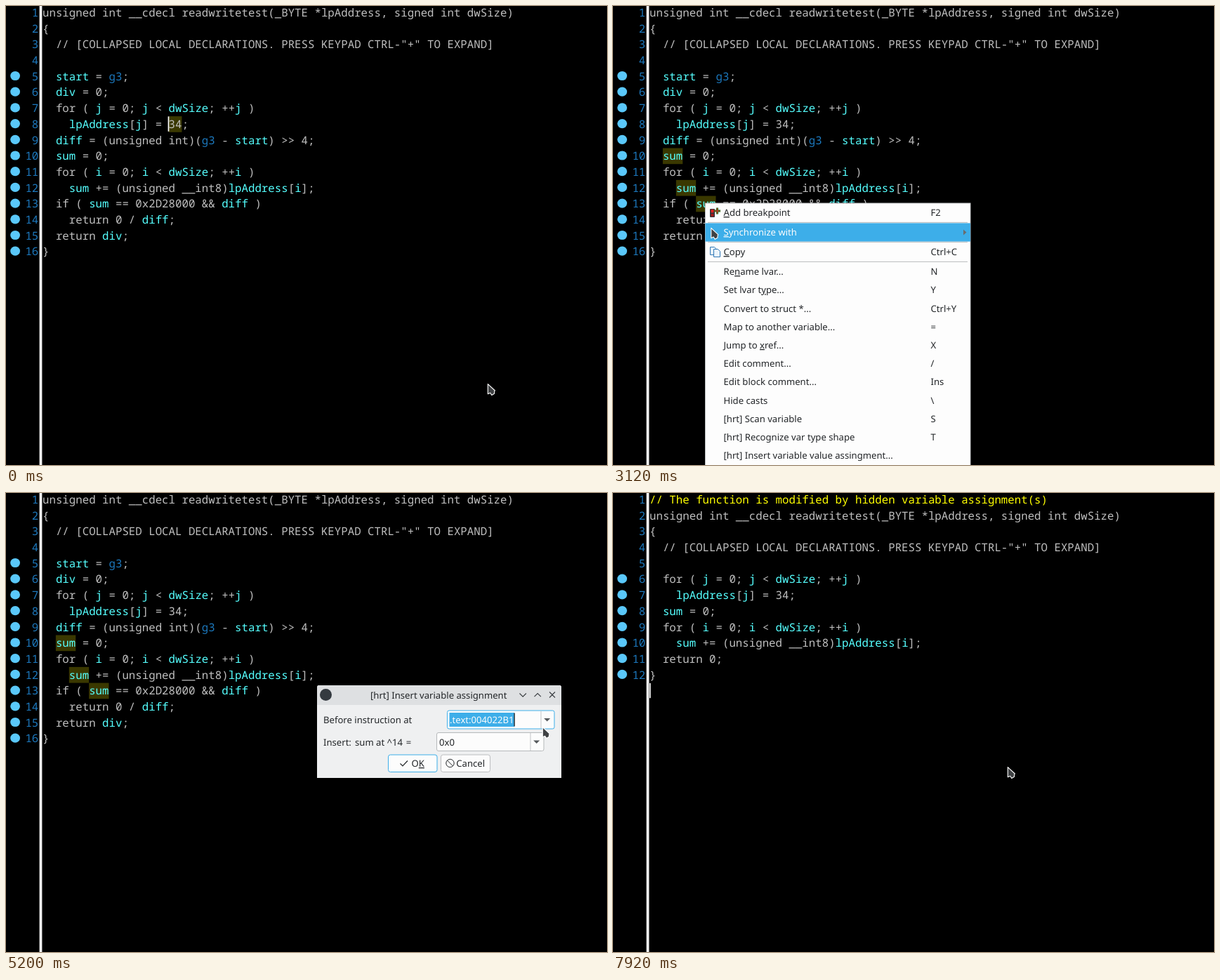
Recreate the animation shown at these times as an HTML page. Size 856 by 654 pixels, loop 8 s.

```html
<!DOCTYPE html>
<html lang="en">
<head>
<meta charset="utf-8">
<title>Inserting a variable assignment</title>
<style>
html, body { margin: 0; width: 100%; height: 100%; overflow: hidden; background: #000; }
svg { display: block; width: 856px; height: 654px; }
text { white-space: pre; text-rendering: geometricPrecision; }
.mono { font: 15.75px "Noto Sans Mono", monospace; fill: #bfbfbf; }
.ui { font: 13.12px "Noto Sans", sans-serif; fill: #232629; }
.var { fill: #55ffff; }
.num { fill: #1c78bd; }
.key { text-decoration: underline; }
</style>
</head>
<body>
<svg id="stage" viewBox="0 0 856 654" xmlns="http://www.w3.org/2000/svg"></svg>
<script>
const LOOP = 8000, STEP = 80;
const CW = 9.45, ROW = 22.7, LEFT = 52;
const BLUE = '#3daee9';

const before = [
  'unsigned int __cdecl readwritetest(_BYTE *lpAddress, signed int dwSize)',
  '{',
  '  // [COLLAPSED LOCAL DECLARATIONS. PRESS KEYPAD CTRL-"+" TO EXPAND]',
  '',
  '  start = g3;',
  '  div = 0;',
  '  for ( j = 0; j < dwSize; ++j )',
  '    lpAddress[j] = 34;',
  '  diff = (unsigned int)(g3 - start) >> 4;',
  '  sum = 0;',
  '  for ( i = 0; i < dwSize; ++i )',
  '    sum += (unsigned __int8)lpAddress[i];',
  '  if ( sum == 0x2D28000 && diff )',
  '    return 0 / diff;',
  '  return div;',
  '}'
];
const after = [
  '// The function is modified by hidden variable assignment(s)',
  ...before.slice(0, 4),
  before[6], before[7], before[9], before[10], before[11],
  '  return 0;',
  '}'
];

// A tilde precedes each accelerator letter.
const menuItems = [
  ['~Add breakpoint', 'F2', 294.5],
  ['~Synchronize with', '', 322.5],
  ['~Copy', 'Ctrl+C', 350.5],
  ...[
    ['Re~name lvar...', 'N'],
    ['Set lvar t~ype...', 'Y'],
    ['Convert to struct *...', 'Ctrl+Y'],
    ['Map to another variable...', '='],
    ['Jump to ~xref...', 'X'],
    ['Edit comment...', '/'],
    ['Edit block comment...', 'Ins'],
    ['Hide casts', '\\'],
    ['[hrt] Scan variable', 'S'],
    ['[hrt] Recognize var type shape', 'T'],
    ['[hrt] Insert variable value assingment...', '']
  ].map(([label, key], i) => [label, key, 378.5 + i * 26.2])
];
const listItems = ['.text:004022B1', '.text:004022ab', '.text:004022ae', '.text:004023B0',
  '00000001800335B8', '180036AF8', '0x00402325', '+0x8012', '+80d2', '+127e'];

// time, x, y, and 1 for a constant-speed segment
const path = [
  [0, 686, 538], [720, 122, 280], [880, 119, 278],
  [960, 150, 262, 1], [1040, 202, 263, 1], [1120, 242, 276, 1], [1200, 264, 280, 1],
  [1440, 264, 280], [2080, 131, 280], [3040, 130, 281],
  [3520, 187, 490, 1], [3920, 200, 609, 1], [4160, 206, 632],
  [4480, 206, 632], [4960, 726, 270], [5200, 764, 333],
  [5280, 764, 333], [5440, 766, 322], [5520, 766, 322], [5920, 644, 360],
  [6720, 644, 360], [7200, 559, 394], [7360, 562, 390], [8000, 562, 390]
];

const esc = s => s.replace(/&/g, '&amp;').replace(/</g, '&lt;');
const rect = (x, y, w, h, fill, more = '') =>
  `<rect x="${x}" y="${y}" width="${w}" height="${h}" fill="${fill}" ${more}/>`;
const text = (cls, x, y, body, more = '') =>
  `<text class="${cls}" x="${x}" y="${y}" ${more}>${body}</text>`;
const line = (d, stroke, width = 1) =>
  `<path d="${d}" fill="none" stroke="${stroke}" stroke-width="${width}"/>`;
const shape = (d, fill) => `<path d="${d}" fill="${fill}"/>`;
const group = (id, body = '') => `<g id="${id}">${body}</g>`;
const ramp = (t, a, b) => Math.min(1, Math.max(0, (t - a) / (b - a)));
const within = (t, a, b) => t >= a && t < b;

const colX = c => LEFT + c * CW;
const rowTop = r => r * ROW - 1.8;
const baseline = r => 14.9 + r * ROW;

function codeLine(s, r, proto) {
  const body = r <= proto ? esc(s) : esc(s).replace(
    /\b(start|div|dwSize|lpAddress|diff|sum|i|j|g3)\b/g,
    v => `<tspan class="${v === 'g3' ? 'num' : 'var'}">${v}</tspan>`);
  const color = s.startsWith('//') ? 'style="fill:#ffff00"' : '';
  return text('mono', LEFT, baseline(r), body, color);
}

function codeView(lines, firstDot) {
  return lines.map((s, r) => {
    const dot = r >= firstDot
      ? `<ellipse cx="13.1" cy="${baseline(r) - 6.2}" rx="6.9" ry="6.6" fill="#5ac8fa"/>` : '';
    return dot + text('mono', 46.3, baseline(r), r + 1,
      'text-anchor="end" style="fill:#1c78bd"') + codeLine(s, r, firstDot - 2);
  }).join('');
}

const mark = (r, c, n) => rect(colX(c), rowTop(r), n * CW, ROW, '#3a3800');
const caret = (r, x) => rect(x - 0.9, rowTop(r) + 0.3, 1.7, ROW - 1.4, '#fff');

function selection(r, from, to, right = colX(to)) {
  return rect(colX(from), rowTop(r), right - colX(from), ROW, '#a0a0a0') +
    text('mono', colX(from), baseline(r), esc(before[r].slice(from, to)), 'style="fill:#fff"');
}

function tooltip(x, y, w, body) {
  return rect(x + 0.5, y + 0.5, w, 25, '#260b12', 'stroke="#8a7c80"') +
    text('mono', x + 1.2, y + 18, body);
}

function menu() {
  const rows = menuItems.map(([label, key, y]) =>
    text('ui', 157.5, y + 4.6, label.replace(/~(.)/, '<tspan class="key">$1</tspan>')) +
    text('ui', 452.5, y + 4.6, esc(key))).join('');
  const rules = [308.4, 336.4, 364.4].map(y => line(`M135 ${y}H505`, '#b9bbbd')).join('');
  const addIcon = rect(138, 289, 7, 12, '#30363c', 'rx="1"') +
    rect(139.5, 290, 4, 4.5, '#e02020') + rect(139.5, 296, 4, 4, '#a01818') +
    line('M148.5 287.5v9M144 292h9', '#176f17', 3) + line('M148.5 288v8M144.5 292h8', '#e03030', 1);
  const copyIcon = '<g fill="#eaf4fc" stroke="#3178b5">' +
    '<path d="M138.5 343.5h6l2 2v9h-8z"/><path d="M143.5 346.5h6l3 3v8h-9z"/></g>';
  return rect(131.5, 281, 377.5, 380, '#fdfdfd', 'stroke="#c4c6c8"') + group('hover') +
    rules + addIcon + copyIcon + shape('M499 318.5l4.5 4l-4.5 4z', '#6a6d70') +
    group('rows', rows);
}

function combo(id, x, y) {
  return rect(x, y, 152.5, 26, '#fcfcfc', `id="${id}" rx="2.5" stroke="#b6b9bb"`) +
    line(`M${x + 133.5} ${y + 0.5}v25`, '#c3c5c7') +
    shape(`M${x + 137.7} ${y + 11}h9l-4.5 4.5z`, '#55595c');
}

function dialog() {
  return shape('M443 406V277q0 -3 3 -3H788q3 0 3 3V406z', '#eff0f1') +
    shape('M443 302V277q0 -3 3 -3H788q3 0 3 3V302z', '#dee0e2') +
    '<circle cx="455.5" cy="287.5" r="8.5" fill="#343a40"/>' +
    text('ui', 519, 293, '[hrt] Insert variable assignment') +
    line('M731.5 285.5l4.7 4.7l4.7 -4.7M752.5 290.2l4.7 -4.7l4.7 4.7' +
      'M774 283.5l8 8M782 283.5l-8 8', '#3a3e42', 1.1) +
    text('ui', 452, 328, 'Before instruction at') +
    text('ui', 452, 359.5, 'Insert:') + text('ui', 497, 359.5, 'sum at ^14') +
    text('ui', 569.8, 359.5, '=') +
    combo('field1', 628.5, 310) + combo('field2', 613.5, 341.5) + group('entry') +
    text('ui', 617, 359.5, '0x0') +
    rect(544.5, 373, 69.5, 24.5, '#fcfcfc', `id="ok" rx="3" stroke="${BLUE}"`) +
    line('M561.5 385.5l3.5 3.5l7 -7.5', '#232629', 1.2) +
    text('ui', 577.5, 390, 'O<tspan class="key">K</tspan>') +
    rect(619.5, 373, 70, 24.5, '#fcfcfc', 'rx="3" stroke="#bcbec0"') +
    '<circle cx="632.5" cy="385" r="5.7" fill="none" stroke="#232629"/>' +
    line('M628.5 381l8 8', '#232629') + text('ui', 641.3, 390, 'Cancel');
}

function popup() {
  return rect(629, 337, 152, 191.5, '#fcfcfc', 'stroke="#c4c6c8"') + group('pick') +
    listItems.map((s, i) => text('ui', 632, 351 + i * 19.2, s)).join('') +
    rect(767.5, 337.5, 13, 190.5, '#e6e7e8') + rect(771, 350, 6, 120, '#b0b4b7', 'rx="3"') +
    shape('M770 343.5l4 -4l4 4zM770 519l4 4l4 -4z', '#55595c');
}

const sumTip = 'int sum; <tspan fill="#c88a28">//</tspan>' +
  '<tspan fill="#7fb6c4"> [esp+14h] [ebp-Ch]</tspan>';

const stage = document.getElementById('stage');
stage.innerHTML = rect(0, 0, 856, 654, '#000') + group('under') +
  group('codeA', codeView(before, 4)) + group('codeB', codeView(after, 5)) +
  rect(47.6, 0, 3.8, 654, '#f2f2f2') + group('over') +
  group('tipA', tooltip(285, 305, 97, '<tspan fill="#dede00">fixed; int</tspan>')) +
  group('tipB', tooltip(153, 308, 285, sumTip)) +
  group('menu', menu()) + group('dialog', dialog()) + group('list', popup()) +
  group('arrow', '<path d="M0.3 0.6V14.8L3.7 13.2L5.8 16.5L9.5 14.2V11.5L10.4 10Z" ' +
    'fill="#404244" stroke="#fff" stroke-width="1.1" stroke-linejoin="round"/>') +
  group('beam', line('M-2.5 -7h2l.5 .5l.5 -.5h2M0 -6.5V6.5M-2.5 7h2l.5 -.5l.5 .5h2', '#222'));

const el = {};
stage.querySelectorAll('[id]').forEach(n => el[n.id] = n);

function fade(node, a) {
  node.style.display = a > 0 ? '' : 'none';
  node.style.opacity = a;
}

function pointer(t) {
  const i = Math.max(1, path.findIndex(p => p[0] > t));
  const [t0, x0, y0] = path[i - 1], [t1, x1, y1, linear] = path[i];
  let k = ramp(t, t0, t1);
  if (!linear) k = k * k * (3 - 2 * k);
  return [x0 + (x1 - x0) * k, y0 + (y1 - y0) * k];
}

function drawCode(t) {
  const done = t >= 7840;
  let under = '', over = '';
  if (t < 880) {
    under = mark(7, 19, 2);
    over = caret(7, colX(19));
  } else if (within(t, 880, 960) || within(t, 2160, 7840)) {
    under = mark(9, 2, 3) + mark(11, 4, 3) + mark(12, 7, 3);
    if (t < 960) over = caret(12, colX(7));
    else if (t < 2880) over = caret(12, colX(9));
  } else if (t < 1120) {
    over = selection(11, t < 1040 ? 10 : 16, 60, 856) + selection(12, 0, 7);
  } else if (t < 2160) {
    const end = t < 1200 ? 20 : 23;
    over = selection(12, 7, end) + caret(12, colX(end));
  } else {
    over = caret(12, 52.8);
  }
  el.under.innerHTML = under;
  el.over.innerHTML = over;
  fade(el.codeA, done ? 0 : 1);
  fade(el.codeB, done ? 1 : 0);
}

function drawMenu(t, y) {
  fade(el.menu, Math.min(ramp(t, 2720, 2880), 1 - ramp(t, 4400, 4640)));
  const hot = t < 3120 ? -1 : menuItems.findIndex(m => Math.abs(m[2] - y) <= 13.1);
  el.hover.innerHTML = hot < 0 ? '' : rect(131.5, menuItems[hot][2] - 13.1, 377.5, 26.2, BLUE);
  [...el.rows.children].forEach((n, i) => n.style.fill = i >> 1 === hot ? '#fcfcfc' : '');
}

function drawDialog(t, y) {
  fade(el.dialog, Math.min(ramp(t, 4480, 4720), 1 - ramp(t, 7680, 7920)));
  const chosen = t >= 6240;
  el.entry.innerHTML =
    (chosen ? '' : rect(631.5, 313, 92.5, 20, BLUE)) +
    text('ui', 632, 328, listItems[chosen ? 1 : 0], chosen ? '' : 'style="fill:#fcfcfc"') +
    (t < 5360 || within(t, 6240, 6560) ? rect(723.5, 313.5, 1.2, 19, '#111') : '') +
    (within(t, 6720, 7200) ? rect(639.5, 345, 1.2, 19, '#111') : '');
  el.field1.setAttribute('stroke', t < 6720 ? BLUE : '#b6b9bb');
  el.field2.setAttribute('stroke', within(t, 6720, 7520) ? BLUE : '#b6b9bb');
  el.ok.setAttribute('fill', within(t, 7520, 7600) ? '#bfe1f5' : '#fcfcfc');

  fade(el.list, Math.min(ramp(t, 5520, 5760), (1 - ramp(t, 6160, 6480)) ** 2));
  const row = y > 356 ? 1 : 0;
  el.pick.innerHTML = rect(629.5, 337.5 + row * 19.2, 138, 19.2, BLUE);
}

function draw(now) {
  const t = Math.floor(now % LOOP / STEP) * STEP;
  const [x, y] = pointer(t);
  drawCode(t);
  fade(el.tipA, t < 1440 ? 0 : 1 - ramp(t, 1520, 1760));
  fade(el.tipB, Math.min(ramp(t, 2320, 2560), 1 - ramp(t, 2560, 2800)));
  drawMenu(t, y);
  drawDialog(t, y);
  const typing = within(t, 6320, 7360) && y < 368 && x > 613;
  fade(el.arrow, typing ? 0 : 1);
  fade(el.beam, typing ? 1 : 0);
  for (const n of [el.arrow, el.beam]) n.setAttribute('transform', `translate(${x} ${y})`);
}

function tick() {
  draw(performance.now());
  requestAnimationFrame(tick);
}
tick();
</script>
</body>
</html>
```
